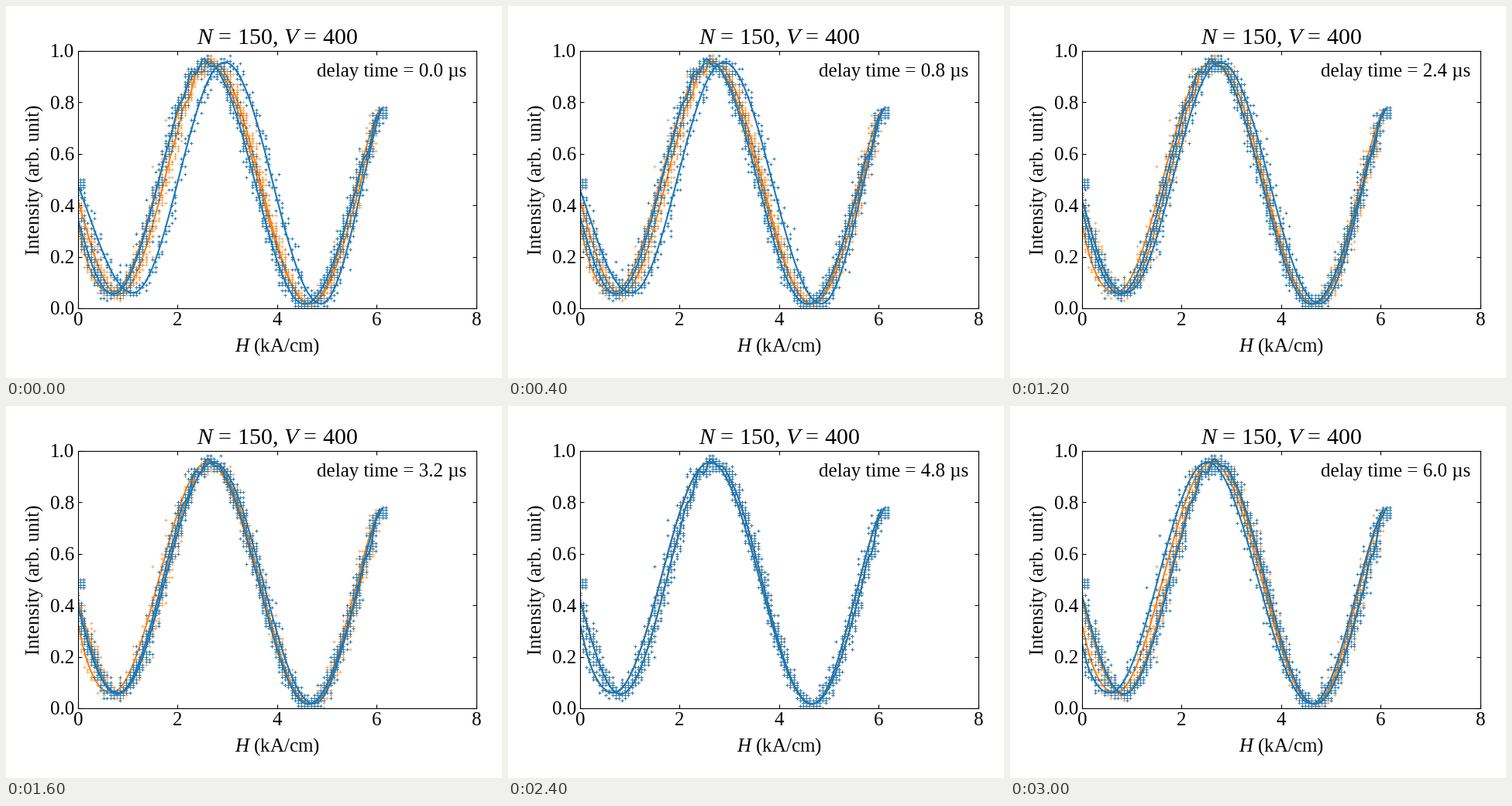
Animation, 640 px wide and 480 px high, one loop 3.1 s. Source, as a matplotlib script:

```python
import numpy as np
import matplotlib.pyplot as plt
from matplotlib.animation import FuncAnimation

plt.rcParams.update({
    "font.family": "Liberation Serif",
    "font.size": 18,
    "mathtext.fontset": "custom",
    "mathtext.rm": "Liberation Serif",
    "mathtext.it": "Liberation Serif:italic",
    "xtick.direction": "in",
    "ytick.direction": "in",
    "xtick.top": True,
    "ytick.right": True,
})

FRAMES = 31
STEP = 0.2          # delay per frame, in microseconds
LAST = 6.0
REFERENCE = 4.8     # delay of the fixed orange curves
TOP_FIELD = 6.1
FIELD_STEP, LEVEL_STEP = 0.065, 0.01


def fringe(x, turns):
    """Half-cosine arcs from one turning point to the next."""
    tx, ty = np.array(turns).T
    i = np.clip(np.searchsorted(tx, x) - 1, 0, len(tx) - 2)
    u = (x - tx[i]) / (tx[i + 1] - tx[i])
    return ty[i] + (ty[i + 1] - ty[i]) * (1 - np.cos(np.pi * u)) / 2


def ripple(x):
    """Small ringing near the first maximum and the end of the rise."""
    bursts = np.exp(-((x - 2.3) / 0.4) ** 2) + np.exp(-((x - 5.85) / 0.25) ** 2)
    return -0.02 * bursts * np.sin(2 * np.pi * (x - 2.06) / 0.265)


def falling_shift(x):
    rate = 0.6 * np.sqrt(1 - x / TOP_FIELD)
    return -rate * (1 - 0.55 * np.exp(-(x / 0.5) ** 2))


def rising_shift(x):
    return 0.14 * (1 - (x / TOP_FIELD) ** 8)


def quantize(values, step):
    return np.round(values / step) * step


class Branch:
    def __init__(self, x, y, shift, rng):
        self.x, self.y, self.shift = x, y, shift
        self.field_noise = rng.normal(0, 0.058, x.size)
        self.level = quantize(y + rng.normal(0, 0.01, x.size), LEVEL_STEP)

    def line(self, delay):
        return self.x + self.shift * delay / LAST, self.y

    def dots(self, delay):
        # intensity samples pair with field samples taken one step later
        noise = np.roll(self.field_noise, -round(delay / STEP))
        field = np.minimum(self.line(delay)[0] + noise, 6.17)
        return quantize(field, FIELD_STEP), self.level


def cluster(start, columns, low, high, count, rng):
    x = start + FIELD_STEP * rng.integers(0, columns, count)
    return x, quantize(rng.uniform(low, high, count), LEVEL_STEP)


rng = np.random.default_rng(4)
down = np.linspace(0, TOP_FIELD - 0.02, 420)
up = np.linspace(-0.15, TOP_FIELD, 1300)
branches = [
    Branch(down, fringe(down, [(-.65, .66), (1.1, .06), (2.95, .955),
                               (4.88, .018), (6.51, .918)]),
           falling_shift(down), rng),
    Branch(up, fringe(up, [(-.8, .7), (.7, .055), (2.57, .955),
                           (4.55, .016), (6.62, .916)]) + ripple(up),
           rising_shift(up), rng),
]
ends = [cluster(0.045, 2, .465, .5, 30, rng),
        cluster(6.045, 3, .74, .78, 60, rng)]

fig = plt.figure(figsize=(6.4, 4.8), dpi=100)
ax = fig.add_axes([92.8 / 640, 90 / 480, 514.2 / 640, 332.2 / 480])
ax.set(xlim=(0, 8), ylim=(0, 1), xticks=range(0, 9, 2))
ax.set_title("$N$ = 150, $V$ = 400")
ax.set_xlabel("$H$ (kA/cm)", labelpad=6.8)
ax.set_ylabel("Intensity (arb. unit)", labelpad=5.2)
label = ax.text(0.6, 0.9, "", transform=ax.transAxes, zorder=5)


def make_set(color, alpha):
    dots, = ax.plot([], [], "+", color=color, ms=2.2, mew=0.7, alpha=alpha)
    lines = [ax.plot([], [], color=color, lw=1.5)[0] for _ in branches]
    return dots, lines


def place(artists, delay):
    dots, lines = artists
    dots.set_data(*np.hstack([b.dots(delay) for b in branches] + ends))
    for line, branch in zip(lines, branches):
        line.set_data(*branch.line(delay))


fixed = make_set("tab:orange", 0.7)
moving = make_set("tab:blue", 1)
place(fixed, REFERENCE)


def update(frame):
    delay = frame * STEP
    place(moving, delay)
    label.set_text(f"delay time = {delay:.1f} µs")
    return [moving[0], *moving[1], label]


anim = FuncAnimation(fig, update, frames=FRAMES, interval=100,
                     init_func=lambda: update(0), repeat=True, repeat_delay=0)
plt.show()
```
